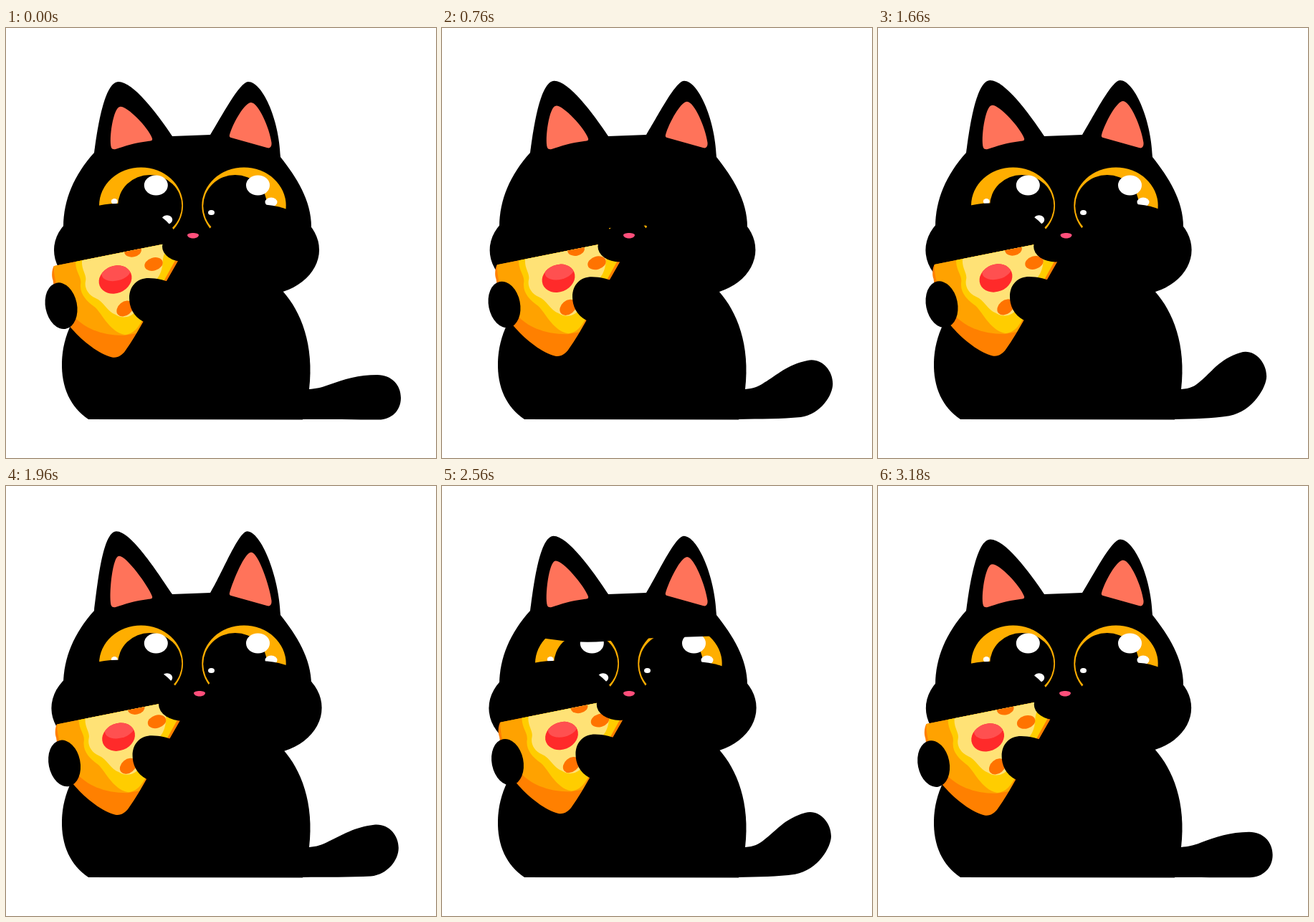
These frames come from a looping animation (600 by 600 pixels, 3200 ms). An HTML page with a canvas:

```html
<!DOCTYPE html>
<html lang="en">
<head>
<meta charset="utf-8">
<title>Cat with pizza</title>
<style>
html, body { margin: 0; width: 100%; height: 100%; overflow: hidden; background: #fff; }
canvas { display: block; width: 100vw; height: 100vh; }
</style>
</head>
<body>
<canvas id="stage" width="600" height="600"></canvas>
<script>
const ctx = document.getElementById('stage').getContext('2d');
const LOOP = 3200;
const BLACK = '#000', WHITE = '#fff', AMBER = '#ffae00', EAR = '#ff735a', PINK = '#ff4f7b';
const CRUST = '#ff8000', ORANGE = '#ffa200', GOLD = '#ffcd00', CHEESE = '#ffe276', SPOT = '#ff7300';

const lerp = (a, b, k) => a + (b - a) * k;

// Triangle wave: 0 at the ends of a period, 1 in the middle.
const tri = (t, period) => 1 - Math.abs(((t / period) % 1) * 2 - 1);

// Linear interpolation through [time, value] pairs.
function track(t, keys) {
  for (let i = 1; i < keys.length; i++) {
    const [t0, v0] = keys[i - 1], [t1, v1] = keys[i];
    if (t <= t1) return lerp(v0, v1, (t - t0) / (t1 - t0));
  }
  return keys[keys.length - 1][1];
}

function fill(d, color) {
  ctx.fillStyle = color;
  ctx.fill(new Path2D(d));
}

function oval(x, y, rx, ry, color, turn = 0) {
  ctx.fillStyle = color;
  ctx.beginPath();
  ctx.ellipse(x, y, rx, ry, turn, 0, Math.PI * 2);
  ctx.fill();
}

function drawTail(k) {
  const p = (x0, y0, x1, y1) => `${lerp(x0, x1, k)},${lerp(y0, y1, k)} `;
  fill('M400,500 L423,504 C' +
    p(432, 503, 436, 503) + p(440, 502, 442, 500) + p(450, 498, 450, 492) + 'C' +
    p(472, 490, 464, 480) + p(492, 484, 474, 459) + p(518, 484, 504, 449) + 'C' +
    p(538, 484, 522, 442) + p(551, 498, 541, 461) + p(551, 516, 541, 482) + 'C' +
    p(551, 534, 541, 496) + p(538, 546.5, 522, 533) + p(520, 546.5, 486, 540.5) + 'C' +
    p(490, 546.5, 462, 545) + p(450, 546, 440, 545) + '413,546 L400,546 Z', BLACK);
}

function drawBody() {
  fill('M115,546 C90,529 77,502 78,466 C79,430 95,395 130,360 L386,367 ' +
    'C412,396 430,442 423,504 L414,546.5 Z', BLACK);
}

function drawEars(h) {
  const lx = 157 - h * 0.25, rx = 338 - h * 0.13, y = 75 - h;
  fill(`M123,174 C128,135 ${lx - 19},${y} ${lx},${y} C${lx + 20},${y} 210,118 232,151 L232,190 L123,190 Z`, BLACK);
  fill(`M285,149 C300,125 ${rx - 12},${y} ${rx},${y} C${rx + 19},${y} 381,125 383,180 L300,190 Z`, BLACK);

  const ix = 159 - h * 0.13, iy = 110 - h * 1.04, jy = 104 - h * 0.97;
  fill(`M147,167 C143,155 ${ix - 9},${iy} ${ix},${iy} C${ix + 9},${iy - 2} 198,138 204,154 ` +
    'C205,158 201,157.5 198,158 C180,160 165,165 153,169 C150,169.5 148,169 147,167 Z', EAR);
  fill(`M312,149 C317,132 333,${jy} 342,${jy} C352,${jy} 368,140 370.5,160 ` +
    'C371,166 368,168.5 364,167 L314,153 Q311,152 312,149 Z', EAR);
}

function drawHead() {
  fill('M123,174 L232,151 L285,149 L383,180 C405,208 426,240 426,278 ' +
    'L386,366 L130,366 L80,277 C80,240 95,205 123,174 Z', BLACK);
}

function drawEyes() {
  oval(188.5, 247.5, 58.5, 53, AMBER);
  oval(200.7, 248, 44.6, 43, BLACK);
  oval(209.3, 219.5, 16.5, 14, WHITE);
  oval(151.3, 242, 4.5, 4, WHITE);
  oval(224.7, 267.5, 7.5, 6.3, WHITE);

  oval(332, 248, 58.7, 53.5, AMBER);
  oval(319.8, 248.5, 44.6, 43.5, BLACK);
  oval(351.5, 219.5, 16.5, 14, WHITE);
  oval(370, 243, 8.5, 6.5, WHITE);
  oval(286.5, 257.5, 4.5, 3.5, WHITE);
}

function drawLids(shut) {
  if (shut <= 0) return;
  const y = lerp(194, 297, shut);
  fill(`M128,194 L128,${y - 4} Q195,${y + 9} 250,${y} L250,194 Z`, BLACK);
  fill(`M271,194 L271,${y - 1} Q330,${y - 3} 391,${y - 5} L391,194 Z`, BLACK);
}

function drawCheeks(puff) {
  oval(155, 310, 88 + 4 * puff, 65 + 2.5 * puff, BLACK);
  oval(356, 309.5, 81 + 4 * puff, 63 + 2.5 * puff, BLACK);
}

function drawSlice() {
  const slice = new Path2D('M70,300 L68,330 C64,335 63,346 65.5,352 C70,385 80,405 92,420 ' +
    'C108,438 130,455 148,459.5 C156,461 162,456 166,451 C176,437 184,423 192,409 L248,311 L230,280 L100,280 Z');
  ctx.fillStyle = CRUST;
  ctx.fill(slice);
  ctx.clip(slice);
  fill('M66,280 L67,340 C70,368 82,388 94,402 C108,417 130,429 165,429 L182,426 L205,380 L205,280 Z', ORANGE);
  fill('M97,280 L97,328 C98,343 106,347 104,358 C103,372 113,381 122,388 ' +
    'C133,395 143,424 166,428 C180,427 187,414 193,402 L244,310 L230,280 Z', GOLD);
  fill('M106,280 L106,325 C105,338 113,344 111,353 C109,362 114,372 125,377 ' +
    'C136,381 141,396 153,400 C162,406 174,404 180,396 L214,345 C222,330 215,322 224,310 L226,280 Z', CHEESE);
  oval(206, 329.5, 13, 9, SPOT, -0.3);
  oval(177, 311, 12, 8.5, SPOT, -0.2);
  oval(166, 391.5, 13, 9.5, SPOT, -0.7);

  ctx.save();
  ctx.beginPath();
  ctx.ellipse(152.5, 351, 23.5, 19, -0.38, 0, Math.PI * 2);
  ctx.clip();
  ctx.fillStyle = '#ff2a2a';
  ctx.fillRect(125, 325, 60, 60);
  oval(154, 340, 21, 12.5, '#ff5050', -0.25);
  ctx.restore();
}

function drawMeal(dx, puff) {
  const dy = -dx * 0.17, cut = puff * 1.3;
  // The mouth line hides the top of the slice.
  ctx.save();
  ctx.beginPath();
  ctx.moveTo(40, 337.5 + cut);
  ctx.lineTo(280, 289.5 + cut);
  ctx.lineTo(300, 480);
  ctx.lineTo(40, 480);
  ctx.clip();
  ctx.translate(dx, dy);
  drawSlice();
  ctx.restore();

  oval(248, 305, 30 + 5.5 * puff, 21.2 + 2 * puff, BLACK);

  ctx.save();
  ctx.translate(dx, dy);
  oval(77, 387.7, 22, 32.7, BLACK, -0.2);
  fill('M192,410 C177,402 172,389 172,377 C172,359 184,349 199,349 ' +
    'C211,349 220,352 227,354 L240,380 Z', BLACK);
  ctx.restore();
}

function draw(t) {
  const puff = tri(t, 800);
  const lift = puff * (t > 800 && t < 1600 ? 21 : 13);
  const shut = 1 - Math.abs(t % 1600 - 800) / 200;
  const sniff = t > 1600 && t < 2400 ? puff * 10 : 0;
  const reach = track(t, [[0, 0], [533, 13], [1067, 6], [1333, 18], [1600, 13.5],
    [2133, 0.3], [2667, 18], [3200, 0]]);

  ctx.fillStyle = WHITE;
  ctx.fillRect(0, 0, 600, 600);
  drawTail(tri(t, LOOP / 3));
  drawBody();
  drawHead();
  drawEars(lift);
  drawEyes();
  drawLids(shut);
  drawCheeks(puff);
  drawMeal(reach, puff);
  fill(`M${253 + sniff},289 c0,-4 16,-4 16,0 c-1,6 -15,6 -16,0 Z`, PINK);
}

const start = performance.now();
function tick() {
  draw((performance.now() - start) % LOOP);
  requestAnimationFrame(tick);
}
tick();
</script>
</body>
</html>
```
